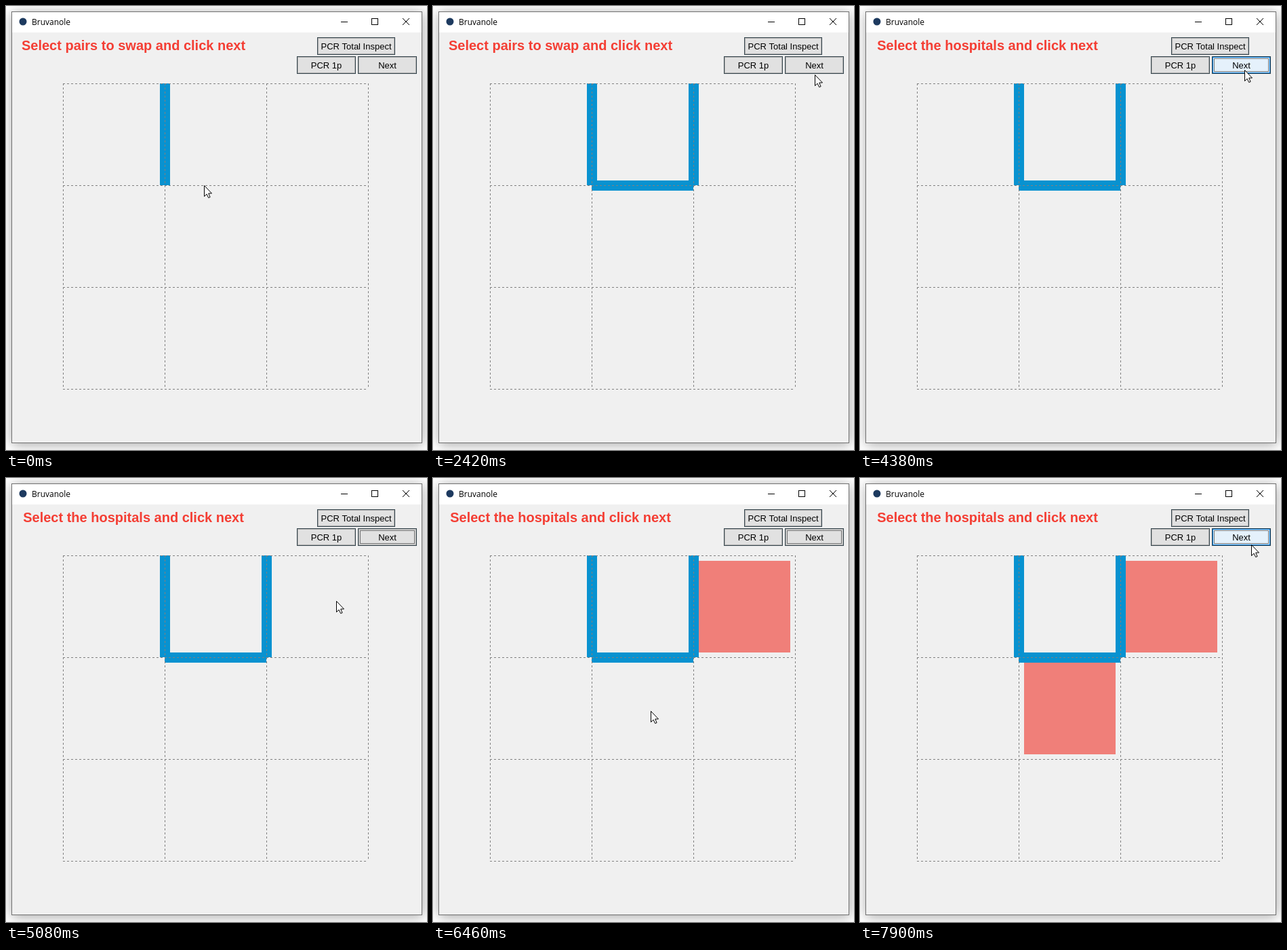
Animation, 621 px wide and 654 px high, one loop 8 s. Source, as an HTML page with a canvas:

```html
<!DOCTYPE html>
<html lang="en">
<head>
<meta charset="utf-8">
<title>Pair swap board</title>
<style>
html, body { margin: 0; width: 100%; height: 100%; overflow: hidden; background: #fff; }
canvas { display: block; }
</style>
</head>
<body>
<canvas id="stage" width="621" height="654"></canvas>
<script>
const ctx = document.getElementById('stage').getContext('2d');
const LOOP = 8000;
const ARIAL = '"Liberation Sans", Arial, sans-serif';
const GRID = { x: 84, y: 114, cell: 150, count: 3 };
const NEXT = { x: 519, y: 74, w: 87, h: 26 };

// Pointer legs: first step time, last step time, steps, destination
const START = [292, 264];
const LEGS = [
  [860, 1330, 5, 385, 210],
  [1940, 2420, 5, 563, 101],
  [2540, 2660, 2, 567, 93],
  [4380, 4380, 1, 567, 94],
  [4600, 5080, 5, 487, 181],
  [6120, 6460, 4, 321, 343],
  [7190, 7900, 7, 577, 98]
];

const ease = p => {
  const q = 1 - (1 - p) ** 1.5;
  return q * q * (3 - 2 * q);
};

function pointerAt(t) {
  let [x, y] = START;
  for (const [from, to, steps, tx, ty] of LEGS) {
    if (t < from) break;
    const gap = steps > 1 ? (to - from) / (steps - 1) : 1;
    const step = Math.min(steps, Math.floor((t - from) / gap + 0.001) + 1);
    const k = ease(step / steps);
    x += (tx - x) * k;
    y += (ty - y) * k;
    if (step < steps) break;
  }
  return [Math.round(x), Math.round(y)];
}

function fill(color, x, y, w, h) {
  ctx.fillStyle = color;
  ctx.fillRect(x, y, w, h);
}

function frame(color, x, y, w, h) {
  ctx.strokeStyle = color;
  ctx.strokeRect(x + 0.5, y + 0.5, w - 1, h - 1);
}

function line(x1, y1, x2, y2) {
  ctx.beginPath();
  ctx.moveTo(x1, y1);
  ctx.lineTo(x2, y2);
  ctx.stroke();
}

function label(text, x, y, font, color, align) {
  ctx.font = font;
  ctx.fillStyle = color;
  ctx.textAlign = align;
  ctx.fillText(text, x, y);
}

function drawWindow() {
  fill('#fff', 0, 0, 621, 654);
  ctx.save();
  ctx.shadowColor = 'rgba(0,0,0,0.36)';
  ctx.shadowBlur = 17;
  ctx.shadowOffsetX = 1;
  ctx.shadowOffsetY = 2;
  fill('#f0f0f0', 8, 8, 606, 636);
  ctx.restore();
  frame('#707070', 8, 8, 606, 636);
  fill('#fff', 9, 9, 604, 30);

  ctx.fillStyle = '#1d3a5f';
  ctx.beginPath();
  ctx.arc(25, 23, 5.5, 0, Math.PI * 2);
  ctx.fill();
  label('Bruvanole', 38, 28, '12px "Open Sans", "Noto Sans", sans-serif', '#000', 'left');

  fill('#000', 494, 23, 10, 1);
  frame('#000', 539, 18, 10, 10);
  line(585, 18, 595, 28);
  line(595, 18, 585, 28);
}

const FACES = {
  normal: ['#adadad', '#e1e1e1'],
  hover: ['#0078d7', '#e5f1fb'],
  pressed: ['#005499', '#cce4f7']
};

function drawButton(text, { x, y, w, h }, state = 'normal', focused = false) {
  const [edge, face] = FACES[state];
  fill('#37474f', x, y, w, h);
  fill(edge, x + 1, y + 1, w - 2, h - 2);
  fill(face, x + 2, y + 2, w - 4, h - 4);
  if (focused) {
    ctx.setLineDash([1, 1]);
    frame('#000', x + 3, y + 3, w - 6, h - 6);
    ctx.setLineDash([]);
  }
  label(text, x + w / 2, y + 18, '13px ' + ARIAL, '#000', 'center');
}

function drawBoard(t) {
  const { x, y, cell, count } = GRID;
  const size = cell * count;
  const blue = '#0892d0', red = '#f07f79';
  if (t >= 5790) fill(red, 392, 122, 135, 135);
  if (t >= 6830) fill(red, 242, 272, 135, 135);
  fill(blue, 227, 114, 15, cell);
  if (t >= 610) fill(blue, 234, 257, cell, 15);
  if (t >= 1570) fill(blue, 377, 114, 15, cell);

  ctx.strokeStyle = '#808080';
  ctx.setLineDash([3, 3]);
  for (let i = 0; i <= count; i++) {
    const d = i * cell + 0.5;
    line(x, y + d, x + size, y + d);
    line(x + d, y, x + d, y + size);
  }
  ctx.setLineDash([]);
}

const ARROW = [[0, 0], [0, 16], [3.6, 12.6], [6.2, 18], [8.6, 17], [6.2, 11.5], [11, 11.5]];

function drawPointer(x, y) {
  ctx.beginPath();
  for (const [dx, dy] of ARROW) ctx.lineTo(x + dx + 0.5, y + dy + 0.5);
  ctx.closePath();
  ctx.fillStyle = '#fff';
  ctx.fill();
  ctx.strokeStyle = '#000';
  ctx.stroke();
}

function nextState(t, x, y) {
  if (t >= 3400 && t < 3510) return 'pressed';
  const inside = x >= NEXT.x && x < NEXT.x + NEXT.w && y >= NEXT.y && y < NEXT.y + NEXT.h;
  return inside ? 'hover' : 'normal';
}

function draw(t) {
  const [px, py] = pointerAt(t);
  ctx.lineWidth = 1;
  drawWindow();
  const task = t < 3510 ? 'pairs to swap' : 'the hospitals';
  label(`Select ${task} and click next`, 188, 65, 'bold 20px ' + ARIAL, '#f43e34', 'center');
  drawButton('PCR Total Inspect', { x: 459, y: 46, w: 115, h: 26 });
  drawButton('PCR 1p', { x: 429, y: 74, w: 87, h: 26 });
  drawButton('Next', NEXT, nextState(t, px, py), t >= 3400);
  drawBoard(t);
  drawPointer(px, py);
}

const begin = performance.now();
function tick() {
  draw((performance.now() - begin) % LOOP);
  requestAnimationFrame(tick);
}
tick();
</script>
</body>
</html>
```
